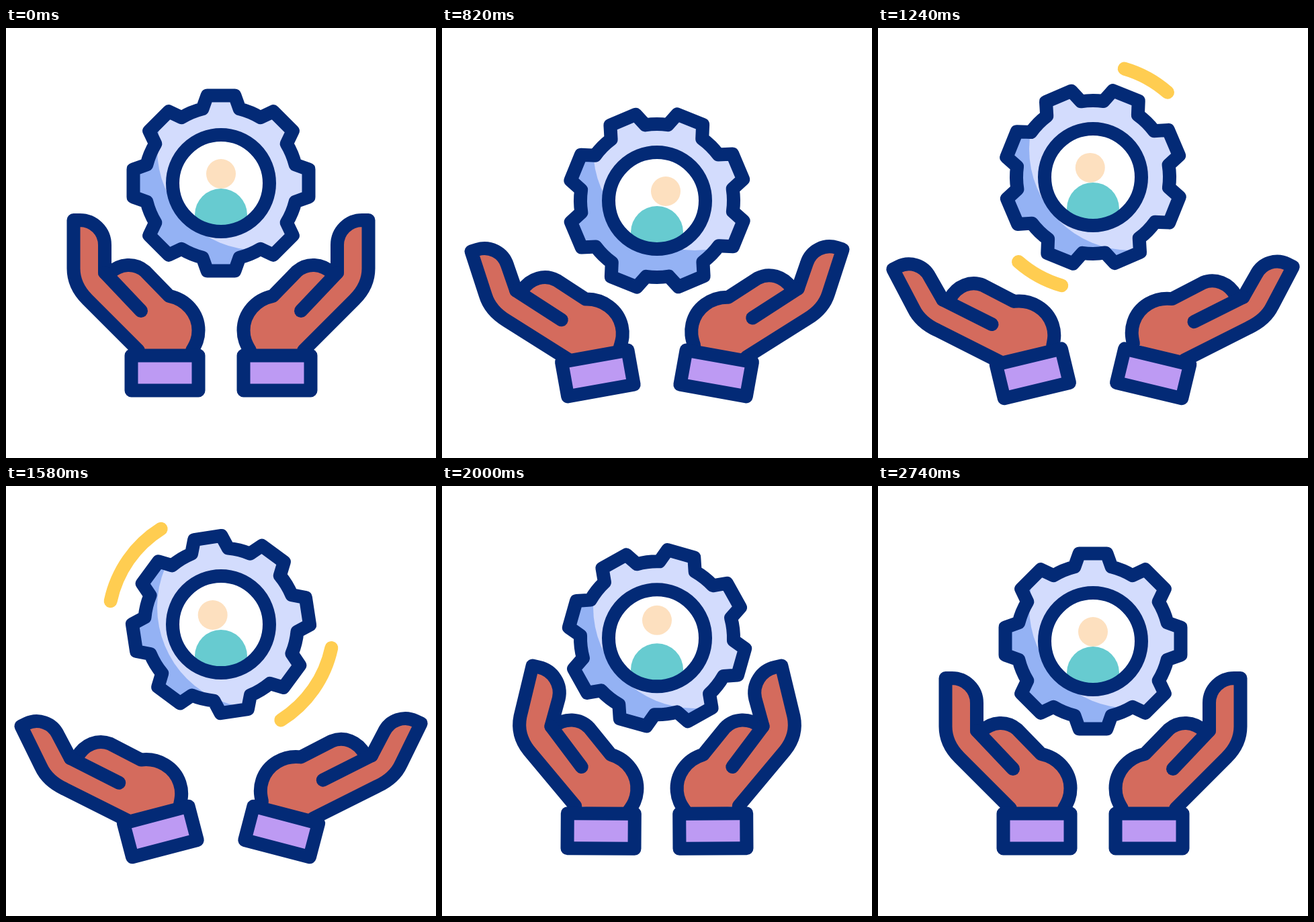
Animation of 640 by 640 pixels, one loop 3 s. Source, as an HTML page with a canvas:

```html
<!DOCTYPE html>
<html lang="en">
<head>
<meta charset="utf-8">
<title>Caring hands</title>
<style>
  html, body { margin: 0; height: 100%; overflow: hidden; background: #fff; }
  canvas { display: block; width: 100vw; height: 100vh; }
</style>
</head>
<body>
<canvas id="stage" width="640" height="640"></canvas>
<script>
const ctx = document.getElementById('stage').getContext('2d');
const NAVY = '#032a76', LIGHT = '#d3dcfd', SHADE = '#94b2f4', TEAL = '#67cbd0', PEACH = '#fde0bf',
      SKIN = '#d46b5d', CUFF = '#bd9af3', YELLOW = '#ffcd51';
const LOOP = 3000, DEG = Math.PI / 180;

// Eased keyframes: [time, value] pairs
function track(...keys) {
  return t => {
    if (t <= keys[0][0]) return keys[0][1];
    for (let i = 1; i < keys.length; i++) {
      const [t0, a] = keys[i - 1], [t1, b] = keys[i];
      if (t < t1) {
        const u = (t - t0) / (t1 - t0);
        return a + (b - a) * u * u * (3 - 2 * u);
      }
    }
    return keys[keys.length - 1][1];
  };
}

const gearY = track([200, 231], [820, 257], [1490, 206], [1560, 206], [2170, 231]);
const gearSpin = track([200, 0], [700, -25], [720, -25], [2400, 180]);
const headX = track([200, 0], [820, 13], [1500, -12.5], [1550, -12.5], [1990, 0]);
const headY = track([1560, 0], [2000, -12.5], [2300, 0]);
const arcHead = track([1050, 15], [1830, 190]);
const arcTail = track([1205, 15], [1960, 190]);
const cuffTurn = track([200, 0], [1100, -13.2], [1560, -14.7], [1640, -14.7], [2190, 6], [2740, 0]);
const palmTurn = track([200, 0], [1400, -5], [1450, -5], [2050, 5], [2700, 0]);
const fingerTurn = track([200, 0], [1400, -9], [1450, -9], [2050, 8], [2700, 0]);

function disc(x, y, r, color) {
  ctx.beginPath();
  ctx.arc(x, y, r, 0, 2 * Math.PI);
  ctx.fillStyle = color;
  ctx.fill();
}

function turn(x, y, degrees) {
  ctx.translate(x, y);
  ctx.rotate(degrees * DEG);
  ctx.translate(-x, -y);
}

function gearPath() {
  ctx.beginPath();
  for (let i = 0; i < 8; i++) {
    const mid = (i * 45 - 90) * DEG, c = Math.cos(mid), s = Math.sin(mid);
    for (const side of [-20.5, 20.5]) {
      if (side < 0) ctx.arc(0, 0, 114, mid - 31 * DEG, mid - 14 * DEG);
      ctx.lineTo(130.5 * c - side * s, 130.5 * s + side * c);
    }
  }
  ctx.closePath();
}

function drawArcs(t, y) {
  const head = arcHead(t), tail = arcTail(t);
  if (head - tail < 0.5) return;
  ctx.strokeStyle = YELLOW;
  for (const offset of [-90, 90]) {
    ctx.beginPath();
    ctx.arc(320, y, 168, (tail + offset) * DEG, (head + offset) * DEG);
    ctx.stroke();
  }
}

function drawGear(t, y) {
  const spin = gearSpin(t) * DEG;
  ctx.save();
  ctx.translate(320, y);
  ctx.rotate(spin);
  gearPath();
  ctx.fillStyle = SHADE;
  ctx.fill();
  ctx.save();
  ctx.clip();
  ctx.rotate(-spin);
  disc(56, 180 - y, 151, LIGHT); // the light stays put while the gear moves
  ctx.restore();
  gearPath();
  ctx.stroke();
  ctx.rotate(-spin);

  disc(0, 0, 72, '#fff');
  ctx.save();
  ctx.beginPath();
  ctx.arc(0, 0, 70, 0, 2 * Math.PI);
  ctx.clip();
  disc(0, 47, 39, TEAL);
  disc(headX(t), headY(t) - 14, 22, PEACH);
  ctx.restore();
  ctx.beginPath();
  ctx.arc(0, 0, 72, 0, 2 * Math.PI);
  ctx.stroke();
  ctx.restore();
}

// Bends and stretches points of the fingers around the knuckle
function bend(x, y, angle) {
  const weight = x < 150 ? Math.min(1, Math.max(0, (410 - y) / 70)) : 0;
  const a = angle * weight * DEG, size = 1 + 0.007 * angle * weight;
  const dx = (x - 125) * size, dy = (y - 395) * size;
  return [125 + dx * Math.cos(a) - dy * Math.sin(a), 395 + dx * Math.sin(a) + dy * Math.cos(a)];
}

function drawHand(t, drop) {
  const cuff = cuffTurn(t), finger = fingerTurn(t);
  const at = (x, y) => bend(x, y, finger);
  const line = (x, y) => ctx.lineTo(...at(x, y));
  const curve = (a, b, c, d, e, f) => ctx.bezierCurveTo(...at(a, b), ...at(c, d), ...at(e, f));

  ctx.save();
  ctx.translate(0, -drop * Math.min(0, cuff));
  turn(237, 540, cuff);
  turn(237, 490, palmTurn(t));
  ctx.beginPath();
  ctx.moveTo(197, 480);
  line(121, 404);
  curve(108, 391, 100.5, 376, 100.5, 358);
  line(100.5, 286);
  line(110, 286);
  curve(130, 286, 147, 302, 147, 323);
  line(147, 364);
  line(154, 365);
  curve(170, 350, 192, 349, 207, 362);
  line(243, 399);
  curve(268, 404, 286.5, 425, 286.5, 450);
  curve(286.5, 462, 283, 470, 277, 480);
  ctx.fillStyle = SKIN;
  ctx.fill();
  ctx.stroke();
  ctx.beginPath();
  ctx.moveTo(...at(147, 364));
  line(201, 421);
  ctx.stroke();
  ctx.restore();

  ctx.save();
  turn(237, 540, cuff);
  ctx.beginPath();
  ctx.rect(186.5, 487.5, 100, 52);
  ctx.fillStyle = CUFF;
  ctx.fill();
  ctx.stroke();
  ctx.restore();
}

function draw(now) {
  const t = now % LOOP, y = gearY(t);
  ctx.fillStyle = '#fff';
  ctx.fillRect(0, 0, 640, 640);
  ctx.lineWidth = 20;
  ctx.lineCap = ctx.lineJoin = 'round';
  drawArcs(t, y);
  ctx.strokeStyle = NAVY;
  drawGear(t, y);
  drawHand(t, 0.28);
  ctx.save();
  ctx.translate(640, 0);
  ctx.scale(-1, 1);
  drawHand(t, 0);
  ctx.restore();
}

const start = performance.now();
function tick() {
  draw(performance.now() - start);
  requestAnimationFrame(tick);
}
tick();
</script>
</body>
</html>
```
